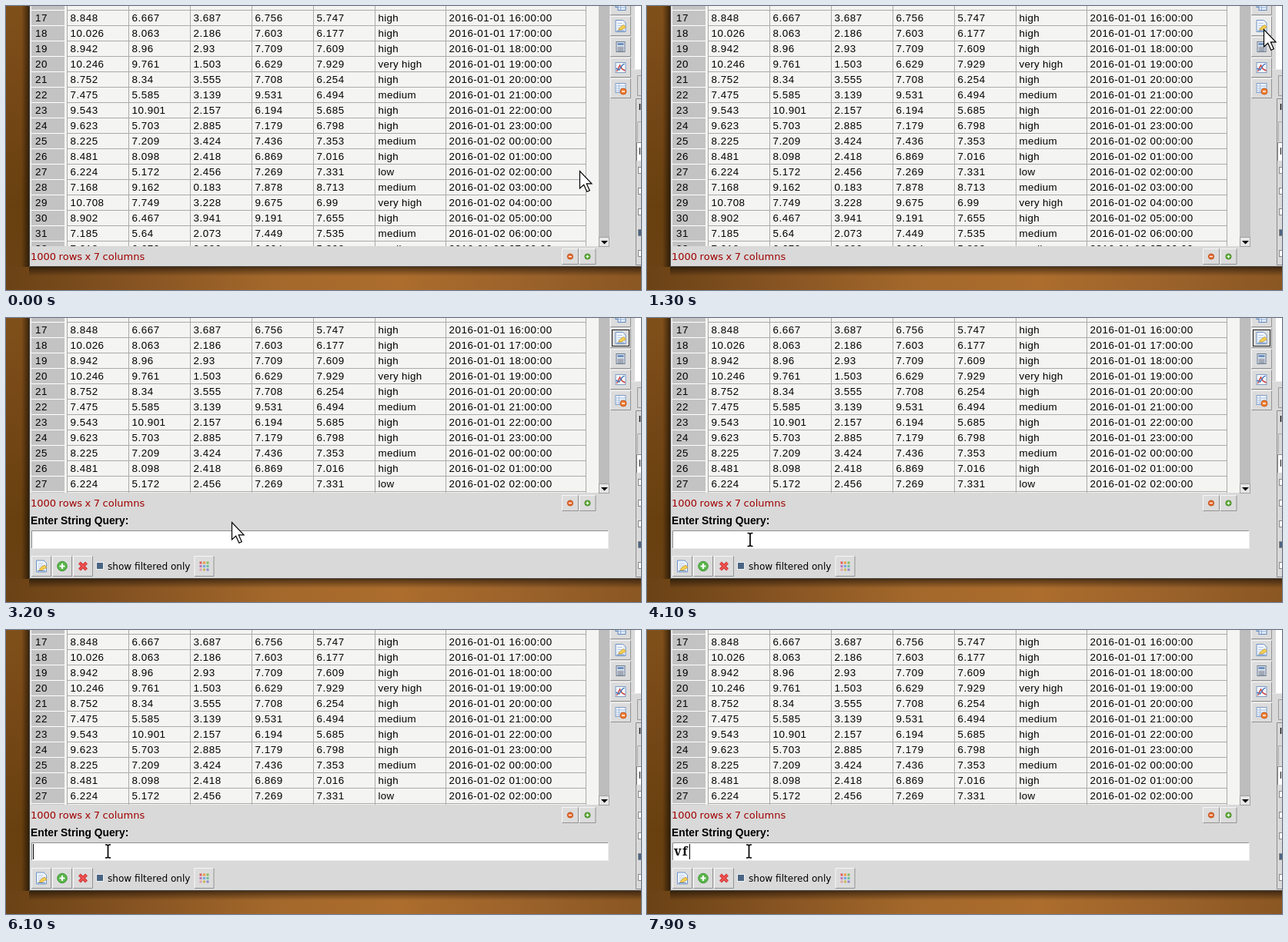
An HTML page that plays this animation: 825 px wide and 369 px high, repeating every 8 s.

```html
<!DOCTYPE html>
<html lang="en">
<head>
<meta charset="utf-8">
<title>Table query</title>
<style>
  html, body { margin: 0; width: 100%; height: 100%; overflow: hidden; background: #7a4c1b; }
  svg { display: block; width: 825px; height: 369px; }
  text { white-space: pre; }
  .cell { font: 13.4px "Liberation Sans", Arial, sans-serif; fill: #000; }
  .num { letter-spacing: .52px; }
  .word { letter-spacing: .3px; }
  .status { font: 13px "DejaVu Sans", sans-serif; fill: #a00000; }
  .label { font: bold 13.8px "Liberation Sans", Arial, sans-serif; }
  .check { font: 12.1px "DejaVu Sans", sans-serif; }
  .typed { font: bold 16px "Noto Serif", serif; }
</style>
</head>
<body>
<svg id="stage" viewBox="0 0 825 369" xmlns="http://www.w3.org/2000/svg"></svg>
<script>
const LOOP = 8000;
const stage = document.getElementById('stage');

const DATA = `8.848 6.667 3.687 6.756 5.747 high
10.026 8.063 2.186 7.603 6.177 high
8.942 8.96 2.93 7.709 7.609 high
10.246 9.761 1.503 6.629 7.929 very_high
8.752 8.34 3.555 7.708 6.254 high
7.475 5.585 3.139 9.531 6.494 medium
9.543 10.901 2.157 6.194 5.685 high
9.623 5.703 2.885 7.179 6.798 high
8.225 7.209 3.424 7.436 7.353 medium
8.481 8.098 2.418 6.869 7.016 high
6.224 5.172 2.456 7.269 7.331 low
7.168 9.162 0.183 7.878 8.713 medium
10.708 7.749 3.228 9.675 6.99 very_high
8.902 6.467 3.941 9.191 7.655 high
7.185 5.64 2.073 7.449 7.535 medium
7.218 6.672 2.886 6.604 5.898 medium`.split('\n').map(r => r.split(' '));
const COLS = [79, 159, 239, 319, 399, 479, 571, 753];

const rect = (x, y, w, h, fill, more = '') =>
  `<rect x="${x}" y="${y}" width="${w}" height="${h}" fill="${fill}" ${more}/>`;
const path = (d, stroke, width = 1, fill = 'none') =>
  `<path d="${d}" stroke="${stroke}" stroke-width="${width}" fill="${fill}"/>`;
const text = (x, y, cls, s, more = '') =>
  `<text x="${x}" y="${y}" class="${cls}" ${more}>${s}</text>`;
const disc = (x, y, r, fill, edge) =>
  `<circle cx="${x}" cy="${y}" r="${r}" fill="${fill}" stroke="${edge}" stroke-width=".8"/>`;
const at = (x, y, body) => `<g transform="translate(${x} ${y})">${body}</g>`;

// Raised button centred on cx, cy
function button(cx, cy, w, h, body, id = '') {
  const l = cx - w / 2 + .5, t = cy - h / 2 + .5, r = l + w - 1, b = t + h - 1;
  return rect(l, t, r - l, b - t, '#dcdcdc', id && `id="${id}"`) +
    path(`M${l} ${b}V${t}H${r}`, '#f6f6f6') +
    path(`M${l} ${b}H${r}V${t}`, '#929292') + at(cx, cy, body);
}

const sheet = path('M-6.5 -7.5H3L6.5 -4V7.5H-6.5Z', '#6f93c4', 1, '#edf3fb') +
  path('M-4 -3.5H2M-4 -.5H3M-4 2.5H0', '#b5cbe6');
const ICONS = {
  stack: rect(-6.5, -6.5, 10, 9, '#dbe7f6', 'stroke="#5f86bd"') +
    rect(-3.5, -2.5, 10, 9, '#eaf1fb', 'stroke="#5f86bd"') + path('M-3 0H6M-3 3H6M0 -2V6', '#8fafd8'),
  query: sheet + path('M-3 5.5L-1 2L4 -1.5L7 1.5L1 5Z', '#c99a28', .8, '#f5cf55') +
    path('M-5 6H5', '#5f86bd'),
  calc: rect(-5.5, -6.5, 11, 13, '#e4eaf2', 'stroke="#66788f"') + rect(-4, -5, 8, 3, '#6e8fbc') +
    path('M-4 .5H4M-4 2.7H4M-4 4.9H4', '#6b7685', 1.2),
  plot: rect(-6.5, -6.5, 13, 13, '#f2f6fc', 'stroke="#7f9cc4"') +
    path('M-5 5L-1 -3L2 2L6 4', '#d13c35', 1.4) + path('M-6 1L-2 3L2 -3L5 -5', '#4475b8', 1.4),
  drop: rect(-6.5, -6.5, 13, 12, '#eef3fa', 'stroke="#7f9cc4"') +
    path('M-6 -3H6M-6 0H6M-6 3H6M-2 -6V5', '#a9c0df') + disc(3.5, 4, 4, '#ee7d32', '#bd4e12') +
    path('M1.5 4H5.5', '#fff', 1.4),
  minus: disc(0, 0, 3.6, '#ea6a2b', '#b5430f') + path('M-2 0H2', '#fff', 1.3),
  plus: disc(0, 0, 3.6, '#5fae38', '#357a18') + path('M-2 0H2M0 -2V2', '#fff', 1.2),
  add: disc(0, 0, 6.3, '#58b648', '#348a2a') + path('M-3.5 0H3.5M0 -3.5V3.5', '#fff', 2.2),
  cross: path('M-4.5 -4.5L4.5 4.5M4.5 -4.5L-4.5 4.5', '#c92a2d', 4) +
    path('M-4.5 -4.5L4.5 4.5M4.5 -4.5L-4.5 4.5', '#ef5350', 2.4),
  dots: ['#e05a5a', '#e69a4a', '#8cba55', '#b878c0', '#75a9dc', '#6cc0a0', '#e0a0a8', '#c8b858', '#8a8ad0']
    .map((c, i) => rect(i % 3 * 4.5 - 6, (i / 3 | 0) * 4.5 - 6, 3, 3, c)).join('')
};

function backdrop() {
  const stops = list => list.map(([o, c]) => `<stop offset="${o}" stop-color="${c}"/>`).join('');
  return `<defs>
    <linearGradient id="side" x2="0" y2="1">${stops([[0, '#80501a'], [.35, '#754716'], [.7, '#68400f'], [1, '#6a4215']])}</linearGradient>
    <linearGradient id="floor">${stops([[0, '#6a4215'], [.2, '#865322'], [.42, '#a3682b'], [.62, '#ac6d2d'], [.85, '#98602a'], [1, '#8a5622']])}</linearGradient>
    <linearGradient id="shadeX">${stops([[0, '#0000'], [1, '#0008']])}</linearGradient>
    <linearGradient id="shadeY" x2="0" y2="1">${stops([[0, '#0008'], [1, '#0000']])}</linearGradient>
    <clipPath id="view"><rect id="viewBox" x="32" y="0" width="738" height="312"/></clipPath>
  </defs>` + rect(0, 0, 30, 369, 'url(#side)') + rect(0, 339, 825, 30, 'url(#floor)') +
    rect(20, 0, 10, 339, 'url(#shadeX)') + rect(30, 339, 795, 12, 'url(#shadeY)') +
    rect(30, 0, 795, 339, '#d9d9d9') + path('M30.5 0V338.5H825', '#45423e');
}

function table() {
  let s = rect(32, 0, 738, 320, '#f4f4f2') + rect(33, 0, 43, 320, '#c3c3c3');
  DATA.forEach((row, i) => {
    const y = 5 + i * 20, base = y + 15, hour = (16 + i) % 24;
    const day = i < 8 ? '01' : '02';
    s += path(`M33 ${y + .5}H76`, '#fff') + path(`M79 ${y + .5}H753`, '#aaa');
    s += text(46, base, 'cell num', 17 + i, 'text-anchor="middle"');
    row.forEach((v, c) => s += text(COLS[c] + 4.5, base, 'cell ' + (c < 5 ? 'num' : 'word'), v.replace('_', ' ')));
    s += text(COLS[6] + 4.5, base, 'cell num', `2016-01-${day} ${String(hour).padStart(2, '0')}:00:00`);
  });
  s += COLS.map(x => path(`M${x + .5} 0V320`, '#aaa')).join('');
  return `<g clip-path="url(#view)">${s}</g>`;
}

function scrollbar() {
  return rect(770, 0, 14, 312, '#bdbdbd', 'id="trough"') +
    `<g id="arrowDown">${rect(770.5, 300.5, 13, 12, '#e6e6e6', 'stroke="#a0a0a0"')}
    ${path('M773 305H782L777.5 309.5Z', 'none', 0, '#000')}</g>`;
}

function toolbar() {
  return ['stack', 'query', 'calc', 'plot', 'drop']
    .map((k, i) => button(798.5, -1 + i * 27, 27, 26, ICONS[k], i === 1 ? 'queryBtn' : '')).join('') +
    rect(787.5, 15.5, 22, 21, 'none', 'id="focus" stroke="#222" stroke-width="1"');
}

// Strip of the neighbouring panel at the right edge
function neighbour() {
  return rect(817, 0, 8, 82, '#fff') + path('M812 82.5H825', '#e9e9e9') +
    path('M825 90.5H820.5V116.5H825', '#999') + path('M825 120.5H818.5V336.5H825', '#8b8b8b') +
    path('M823.5 127V135', '#111', 1.4) + path('M825 150.5H820.5V176', '#aaa') +
    rect(820, 177, 5, 24, '#fff') + path('M825 177.5H819.5V201', '#888') + path('M823.5 184V193', '#111') +
    [209, 236, 263, 290, 317].map((y, i) =>
      rect(821.5, y + .5, 8, 8, i === 3 ? '#4a6484' : '#fff', 'stroke="#888"')).join('');
}

function status() {
  return `<g id="status">${text(32, 330, 'status', '1000 rows x 7 columns', 'word-spacing="-.6"')}
    ${button(733, 325.5, 22, 21, ICONS.minus)}${button(755.5, 325.5, 22, 21, ICONS.plus)}</g>`;
}

function queryPanel() {
  return `<g id="panel">` + text(32, 268, 'label', 'Enter String Query:') +
    rect(33, 276, 750, 24, '#fff') + path('M33.5 300V276.5H783', '#8c8c8c') + path('M33 299.5H782.5V276', '#eee') +
    text('35 46', 293, 'typed', '', 'id="typed"') + rect(35, 278, 1, 20, '#000', 'id="caret"') +
    button(46, 322.5, 26, 27, ICONS.query) + button(73, 322.5, 26, 27, ICONS.add) +
    button(100, 322.5, 26, 27, ICONS.cross) +
    rect(117.5, 317.5, 9, 9, '#4a6484', 'stroke="#f0f0f0"') +
    text(132, 327, 'check', 'show filtered only') + button(257.5, 322.5, 26, 27, ICONS.dots) + '</g>';
}

const beam = 'M-3.5 -8.5H-1.5L0 -7.5L1.5 -8.5H3.5M0 -7.5V7.5M-3.5 8.5H-1.5L0 7.5L1.5 8.5H3.5';
const pointers = `<g id="arrow">${path('M.5 .5V23L5.7 18.2L9.8 27.3L13.3 25.7L9.3 16.9H16Z', '#000', 1.2, '#fff')}</g>
  <g id="beam">${path(beam, '#fff', 4)}${path(beam, '#000', 1.7)}</g>`;

stage.innerHTML = backdrop() + table() + scrollbar() + toolbar() + neighbour() + status() + queryPanel() + pointers;

const el = id => document.getElementById(id);
const show = (id, on) => el(id).setAttribute('visibility', on ? 'inherit' : 'hidden');
const shift = (id, x, y) => el(id).setAttribute('transform', `translate(${x} ${y})`);

// Pointer stops: time, x, y
const STOPS = [
  [0, 745, 214], [400, 745, 214], [1000, 811, 42], [1100, 811, 42], [1300, 801, 30], [3100, 801, 30],
  [3200, 293, 265], [3800, 137, 291], [4000, 137, 291], [4100, 134, 288], [4300, 132.5, 287.5], [LOOP, 132.5, 287.5]
];
const BLINKS = [4300, 4900, 5200, 5700, 6100, 6700, 7000, 7600, 7900];

function pointerAt(t) {
  const i = STOPS.findIndex(s => s[0] > t);
  const [t0, x0, y0] = STOPS[i - 1], [t1, x1, y1] = STOPS[i];
  const k = (t - t0) / (t1 - t0), e = k * k * (3 - 2 * k);
  return [x0 + (x1 - x0) * e, y0 + (y1 - y0) * e];
}

function draw(ms) {
  const t = Math.floor(ms / 100) * 100;
  const open = t >= 3200, lift = open ? -85 : 0;
  const [x, y] = pointerAt(t);
  const overEntry = open && y >= 276 && y < 300;
  const typed = t >= 6800 ? 'vf' : t >= 6300 ? 'v' : '';

  el('viewBox').setAttribute('height', 312 + lift);
  el('trough').setAttribute('height', 312 + lift);
  shift('arrowDown', 0, lift);
  shift('status', 0, lift);
  show('panel', open);
  show('focus', open && t < 4300);
  el('queryBtn').setAttribute('fill', t >= 1200 && !open ? '#ececec' : '#dcdcdc');

  el('typed').textContent = typed;
  el('caret').setAttribute('x', 35 + typed.length * 10);
  show('caret', open && BLINKS.filter(b => b <= t).length % 2 === 1);

  show('arrow', !overEntry);
  show('beam', overEntry);
  shift(overEntry ? 'beam' : 'arrow', x, y);
}

const start = performance.now();
function tick() {
  draw((performance.now() - start) % LOOP);
  requestAnimationFrame(tick);
}
tick();
</script>
</body>
</html>
```
